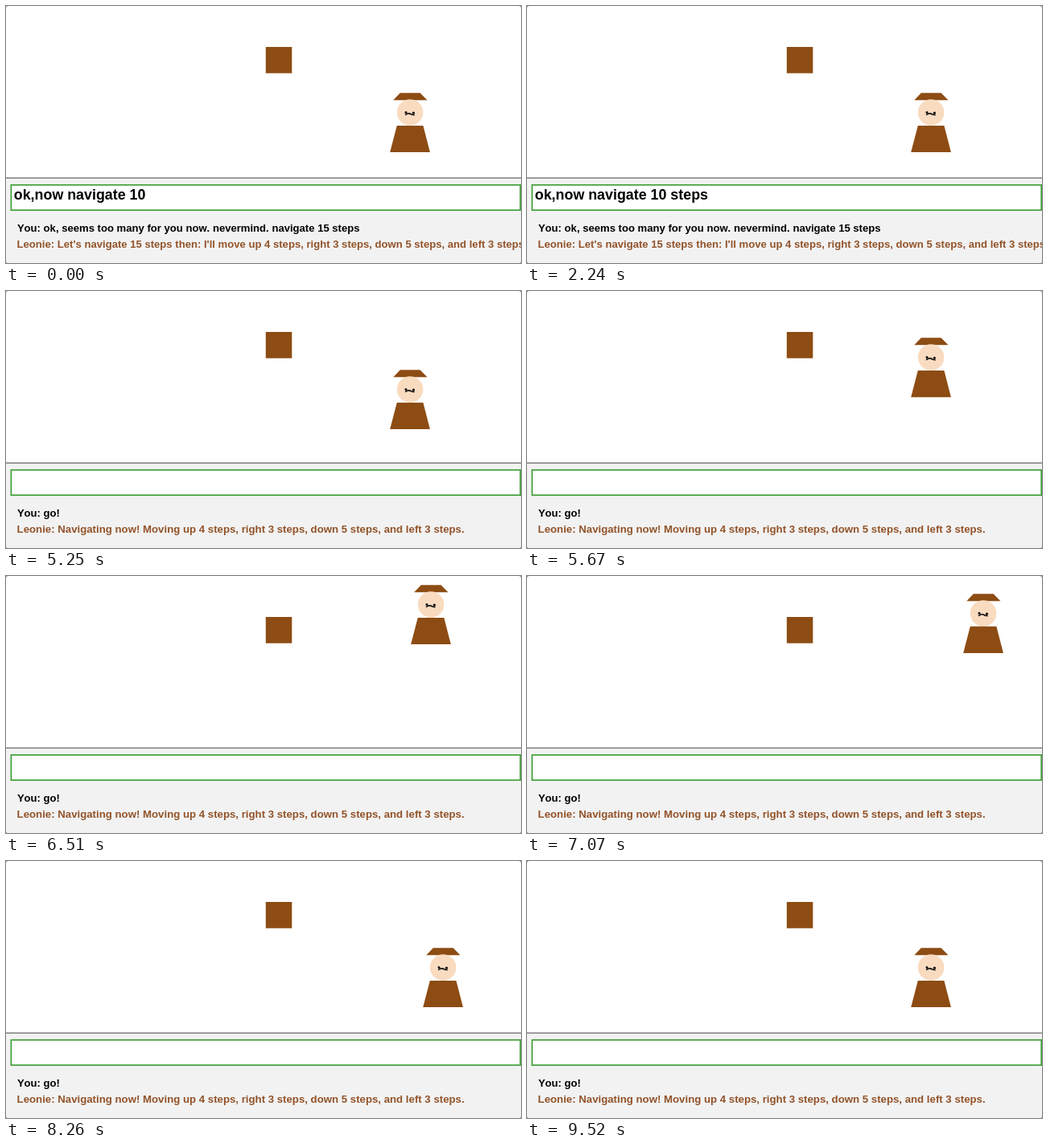
Write an HTML page that moves like this. It is 640 px wide and 320 px high and loops after 9590 ms.

```html
<!DOCTYPE html>
<html lang="en">
<head>
<meta charset="utf-8">
<title>Navigation chat</title>
<style>
  html, body { margin: 0; width: 100%; height: 100%; overflow: hidden; background: #8a8a8a; }
  svg { display: block; width: 640px; height: 320px; border-radius: 3px; background: #fff; }
  text { font: bold 13.1px "Liberation Sans", Arial, sans-serif; font-kerning: none; white-space: pre; }
  .brown { fill: #8d4c13; }
  text.brown { fill: #925329; }
  #field { font-size: 17.85px; }
  #moving { font-size: 13.22px; }
</style>
</head>
<body>
<svg viewBox="0 0 640 320">
  <rect class="brown" x="322.8" y="51" width="32.5" height="32.7"/>

  <g id="walker">
    <path class="brown" d="M489.8 108.2h24.8l8.9 9h-42.2z"/>
    <circle cx="502.1" cy="132.5" r="16.3" fill="#f9dbc0"/>
    <path class="brown" d="M485.8 148.9h32.6l8.5 33.2h-49.7z"/>
    <g fill="#111">
      <circle cx="497" cy="132.4" r="1.5"/>
      <circle cx="506.4" cy="133.2" r="1.6"/>
      <path d="M496 135.6L499 134Q502 133.4 503.6 135L507.6 135.8" fill="none" stroke="#111" stroke-width="1.6"/>
    </g>
  </g>

  <rect y="214" width="640" height="106" fill="#f2f2f2"/>
  <rect y="213.4" width="640" height="1.6" fill="#858585"/>
  <rect x="6.4" y="222.8" width="632.8" height="31.4" fill="#fff" stroke="#3f9f37" stroke-width="1.7"/>
  <text id="field" x="9.8" y="241">ok,now navigate 10</text>

  <g id="before">
    <text x="13.9" y="281.3">You: ok, seems too many for you now. nevermind. navigate 15 steps</text>
    <text class="brown" x="13.6" y="301.4">Leonie: Let's navigate 15 steps then: I'll move up 4 steps, right 3 steps, down 5 steps, and left 3 steps.</text>
  </g>
  <g id="after" visibility="hidden">
    <text x="13.9" y="281.3">You: go!</text>
    <text id="moving" class="brown" x="13.6" y="301.4">Leonie: Navigating now! Moving up 4 steps, right 3 steps, down 5 steps, and left 3 steps.</text>
  </g>
</svg>
<script>
  const LOOP = 9590, TICK = 70, SENT = 4620;
  const typed = "ok,now navigate 10 steps";
  const keyTimes = [1190, 1260, 1540, 2170, 2240];

  // Waypoints: time, x offset, y offset
  const route = [
    [5145, 0, 0], [6165, 0, -97],
    [6237, 0, -97], [6921, 65, -97],
    [6955, 65, -97], [7975, 65, 0],
    [8008, 65, 0], [8692, 0, 0]
  ];

  const get = id => document.getElementById(id);
  const walker = get("walker"), field = get("field");
  const before = get("before"), after = get("after");
  const show = (el, on) => el.setAttribute("visibility", on ? "visible" : "hidden");

  function position(t) {
    const i = route.findIndex(p => p[0] > t);
    if (i < 1) return [0, 0];
    const [t0, x0, y0] = route[i - 1], [t1, x1, y1] = route[i];
    const k = (t - t0) / (t1 - t0);
    return [x0 + (x1 - x0) * k, y0 + (y1 - y0) * k];
  }

  function draw(t) {
    const sent = t >= SENT;
    const keys = keyTimes.filter(k => k <= t).length;
    field.textContent = sent ? "" : typed.slice(0, typed.length - keyTimes.length + keys);
    show(before, !sent);
    show(after, sent);
    walker.setAttribute("transform", `translate(${position(t)})`);
  }

  const start = performance.now();
  function loop() {
    const t = (performance.now() - start) % LOOP;
    draw(Math.floor(t / TICK) * TICK);
    requestAnimationFrame(loop);
  }
  loop();
</script>
</body>
</html>
```
